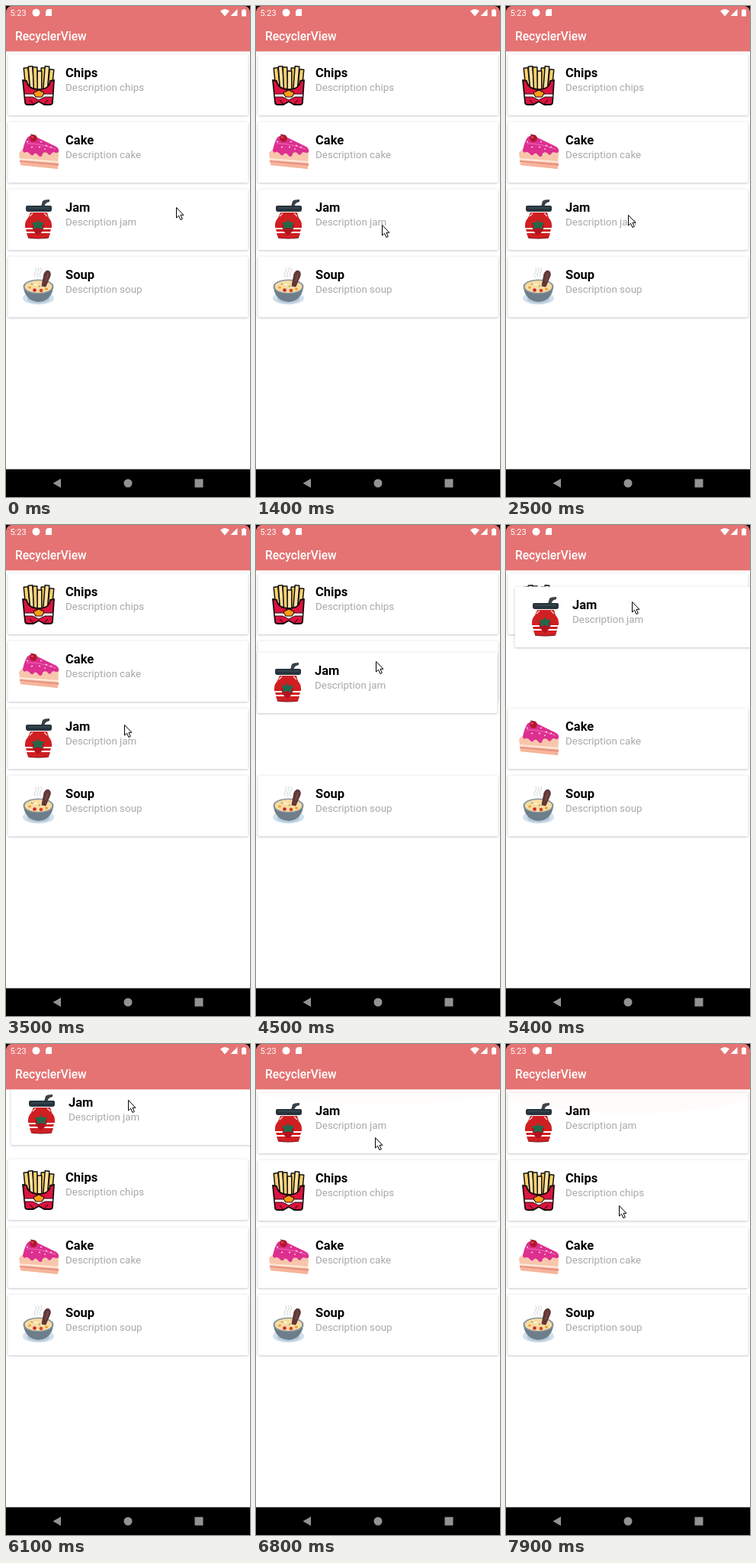
An HTML page with a canvas for the animation above (8000 ms loop, 320 by 642 pixels).

```html
<!DOCTYPE html>
<html lang="en">
<head>
<meta charset="utf-8">
<title>Reorderable list</title>
<style>
html, body { margin: 0; width: 100%; height: 100%; overflow: hidden; background: #fff; }
canvas { display: block; width: 320px; height: 642px; }
</style>
</head>
<body>
<canvas id="stage" width="320" height="642"></canvas>
<script>
const ctx = document.getElementById('stage').getContext('2d');
const LOOP = 8000, STEP = 100;
const TOP = 63, PITCH = 88, BAR = 59;
const GRAB = 3700, DROP = 6400;

// Pointer path: time, x, y
const PATH = [
  [200, 223, 263], [600, 184, 273], [1000, 155, 281], [1100, 155, 281],
  [1400, 165, 286], [1700, 154, 281], [2000, 161, 278], [2100, 161, 278],
  [2200, 157, 276], [2300, 157, 276], [2700, 163, 270], [3200, 155, 261],
  [GRAB, 155, 261], [4000, 154, 277], [4200, 154, 252], [4400, 154, 193],
  [4500, 157, 178], [4600, 158, 165], [5000, 163, 125], [5300, 165, 101],
  [5400, 165, 100], [5500, 165, 98], [5850, 162, 83], [6000, 160, 73],
  [DROP, 160, 73], [7300, 151, 183], [7500, 149, 205], [7700, 148, 215], [7900, 148, 211]
];

const clamp = v => Math.max(0, Math.min(1, v));
const ease = v => (1 - Math.cos(Math.PI * clamp(v))) / 2;

function pointer(t) {
  const i = PATH.findIndex(p => p[0] > t);
  if (i === 0) return PATH[0].slice(1);
  if (i < 0) return PATH[PATH.length - 1].slice(1);
  const a = PATH[i - 1], b = PATH[i], k = (t - a[0]) / (b[0] - a[0]);
  return [a[1] + (b[1] - a[1]) * k, a[2] + (b[2] - a[2]) * k];
}

// Drag offset trails the pointer, then settles two rows up
function dragOffset(t) {
  if (t <= GRAB) return [0, 0];
  const [x, y] = pointer(Math.min(t, DROP) - 60);
  const dx = x - 156, dy = y - 260, k = ease((t - DROP) / 250);
  return [dx * (1 - k), dy + (-2 * PITCH - dy) * k];
}

function shape(d, fill, stroke, width = 1) {
  const p = new Path2D(d);
  if (fill) { ctx.fillStyle = fill; ctx.fill(p); }
  if (stroke) { ctx.strokeStyle = stroke; ctx.lineWidth = width; ctx.stroke(p); }
}

function oval(x, y, rx, ry, fill) {
  ctx.beginPath();
  ctx.ellipse(x, y, rx, ry, 0, 0, 7);
  ctx.fillStyle = fill;
  ctx.fill();
}

function label(text, x, y, font, color) {
  ctx.font = font + ' Roboto, sans-serif';
  ctx.fillStyle = color;
  ctx.fillText(text, x, y);
}

function fry(x, y, tilt, color) {
  ctx.save();
  ctx.translate(x, y);
  ctx.rotate(tilt);
  shape('M-2.8 0h5.6v32h-5.6z', color, '#111', 1.5);
  ctx.restore();
}

function chips() {
  fry(26, 18, -.1, '#fdd06a');
  fry(60, 20, .1, '#fdd06a');
  fry(49, 18, .04, '#fdc95c');
  fry(32, 16, -.08, '#ffe2a0');
  fry(54, 16, .08, '#ffe2a0');
  fry(38, 17, -.04, '#fdd06a');
  fry(44, 22, 0, '#ffe2a0');
  shape('M22 34L27 35Q29 46 43 46T58 35L63 34L61 63Q61 66 57 66H50L43 62L36 66H29Q25 66 25 63Z', '#dc143f', '#16080c', 1.8);
  shape('M24 52H37L43 55L49 52H61.5V56H51L43 60L35 56H24.5Z', '#fff', '#2a0a12', 1);
  shape('M31 60L36 65M55 60L50 65', null, '#5e0a20', 1.4);
  shape('M37 53Q35 49 39 49Q43 45 47 49Q51 49 49 53L47 56H39Z', '#ff9b18', '#2a0a12', 1.2);
}

function cake() {
  shape('M17 41L25 33L69 39L68 62L19 57Z', '#f8c6ac');
  shape('M18 48L69 52V54L18 50Z', '#ffeadb');
  shape('M18 51L69 55V58L18 53Z', '#e99483');
  shape('M19 54L68 58V62L19 57Z', '#f7b49a');
  shape('M22 38Q24 27 28 21Q32 17 37 19L66 33Q70 36 69 40Q66 42 63 40Q60 40 59 43Q56 45 54 41Q50 39 48 42Q47 48 43 45Q40 40 37 42Q35 46 32 43Q28 39 26 40Q23 42 22 38Z', '#dd2f90');
  shape('M27 29Q42 28 65 36', null, '#ec5dad', 1.4);
  shape('M27 26l2 1M45 27l2-1M52 31l2 1M43 33l2 1M58 34l2-1M33 34l2-1M50 36l2 0', null, '#fff', 1.2);
  oval(36, 22, 4.8, 4.8, '#b5172d');
  oval(34.5, 20.5, 1.3, 1.1, '#f06c70');
  shape('M36 19Q35 17 32 17', null, '#6c2626', 1.1);
}

function jam() {
  shape('M46 23L48 16Q50 14 57 14V17Q52 18 51 21L50 24Z', '#3a4248');
  shape('M32 31H54L56 38Q60 42 60 48V51H25V48Q25 42 29 38Z', '#d01f22');
  shape('M26 53H59L58 56H27ZM27 58H58L56 64Q42 66 29 64Z', '#d01f22');
  shape('M31 36L35 32M54 36L50 32', null, '#f6d9d4', 1.2);
  shape('M34 47Q42 42 50 47Q50 56 42 61Q34 56 34 47Z', '#b3131f');
  shape('M42 40L44 44L50 44L47 49L49 53L42 51L35 53L37 49L34 44L40 44Z', '#22694b');
  shape('M29 64Q42 66 56 64', null, '#7c1520', 1.2);
  shape('M28 22H58Q60 22 60 24V27Q60 30 57 30H29Q26 30 26 27V24Q26 22 28 22Z', '#27343d');
  shape('M29 25H57', null, '#43545e', 1);
}

function soup() {
  for (const x of [38.5, 42, 45.5])
    shape(`M${x} 28Q${x - 3} 24 ${x} 21T${x} 15`, null, '#d3d6da', 1);
  oval(42.5, 55, 20.5, 8.5, '#d3e1ec');
  oval(42.5, 56, 15, 6, '#b5cadb');
  shape('M23 41H62Q61 51 53 57Q43 63 32 57Q24 51 23 41Z', '#6d7d89');
  oval(42.5, 40, 20, 9.5, '#84929d');
  oval(42.5, 40, 17.8, 8, '#f8dca3');
  shape('M47 39L50 23Q53 17 57 20Q59 22 58 26L52 40Z', '#62383a', '#4d2a28', .8);
  shape('M52 33L55 23', null, '#835047', 1.2);
  oval(37.5, 44.5, 2.4, 2.2, '#cc2730');
  oval(46, 45, 2.4, 2.2, '#d64825');
  oval(53, 43, 2, 1.6, '#eb9b25');
  oval(31, 41, 1.9, 1.5, '#ec9c32');
  oval(39, 37, 2.4, 1.6, '#fff1c9');
  shape('M33 36l2 1M43 40l2-1', null, '#6c9a42', 1.1);
}

function card(name, icon, dx, y) {
  ctx.save();
  ctx.translate(Math.round(dx), Math.round(y));
  ctx.save();
  ctx.shadowColor = 'rgba(0,0,20,.26)';
  ctx.shadowBlur = 3;
  ctx.shadowOffsetY = .7;
  ctx.fillStyle = '#fff';
  ctx.beginPath();
  ctx.roundRect(2.5, .5, 315, 79.5, 2);
  ctx.fill();
  ctx.restore();
  icon();
  label(name, 78, 30, 'bold 16.5px', '#000');
  label('Description ' + name.toLowerCase(), 78, 48.3, '13.4px', '#a8a8a8');
  ctx.restore();
}

function list(t) {
  ctx.save();
  ctx.beginPath();
  ctx.rect(0, BAR, 320, 547);
  ctx.clip();
  const [dx, dy] = dragOffset(t);
  const row = n => TOP + PITCH * n;
  card('Chips', chips, 0, row(ease((t - 5870) / 250)));
  card('Cake', cake, 0, row(1 + ease((t - 4640) / 250)));
  card('Soup', soup, 0, row(3));
  card('Jam', jam, dx, row(2) + dy);
  const glow = clamp((t - 6500) / 500);
  if (glow) oval(160, BAR, 170, 32 * glow, `rgba(229,115,115,${.03 * glow})`);
  ctx.restore();
}

function bars() {
  ctx.fillStyle = '#e57373';
  ctx.fillRect(0, 0, 320, BAR);
  ctx.fillStyle = 'rgba(229,115,115,.4)';
  ctx.fillRect(0, BAR, 320, 1);
  label('5:23', 5.5, 12.7, '10.9px', '#fff');
  label('RecyclerView', 12, 44.5, '500 15.57px', '#fff');
  oval(39.5, 8.8, 5, 5, '#fff');
  shape('M54.5 4H60V13H52V6.5Z', '#fff');
  shape('M281 6.5Q287 1.5 293 6.5L287 13.5Z', '#fff');
  shape('M303.5 4V13H294.5Z', '#fff');
  shape('M309 5H311V4H313V5H315V13.5H309Z', '#fff');
  shape('M0 0H7Q1 1 0 7ZM320 0H313Q319 1 320 7Z', '#000');

  ctx.fillStyle = '#000';
  ctx.fillRect(0, 605.7, 320, 37);
  shape('M61.5 624L72 618V630Z', '#929292');
  oval(160, 624, 5.5, 5.5, '#929292');
  shape('M247.5 618.5H258.5V629.5H247.5Z', '#929292');
}

function cursor(t) {
  const [x, y] = pointer(t).map(Math.round);
  if (t >= 3300 && t < 3500) {
    ctx.beginPath();
    ctx.arc(x, y, t < 3400 ? 7 : 10, 0, 7);
    ctx.strokeStyle = 'rgba(120,120,120,.4)';
    ctx.lineWidth = 1;
    ctx.stroke();
  }
  ctx.save();
  ctx.translate(x + .5, y + .5);
  shape('M0 0V13.5L3.1 10.7L5.4 16L7.8 15L5.5 9.8H9.4Z', '#fff', '#000', 1);
  ctx.restore();
}

function draw(now) {
  const t = Math.floor(now % LOOP / STEP) * STEP;
  ctx.fillStyle = '#fff';
  ctx.fillRect(0, 0, 320, 642);
  list(t);
  bars();
  cursor(t);
  requestAnimationFrame(draw);
}

ctx.lineJoin = 'round';
draw(0);
</script>
</body>
</html>
```
